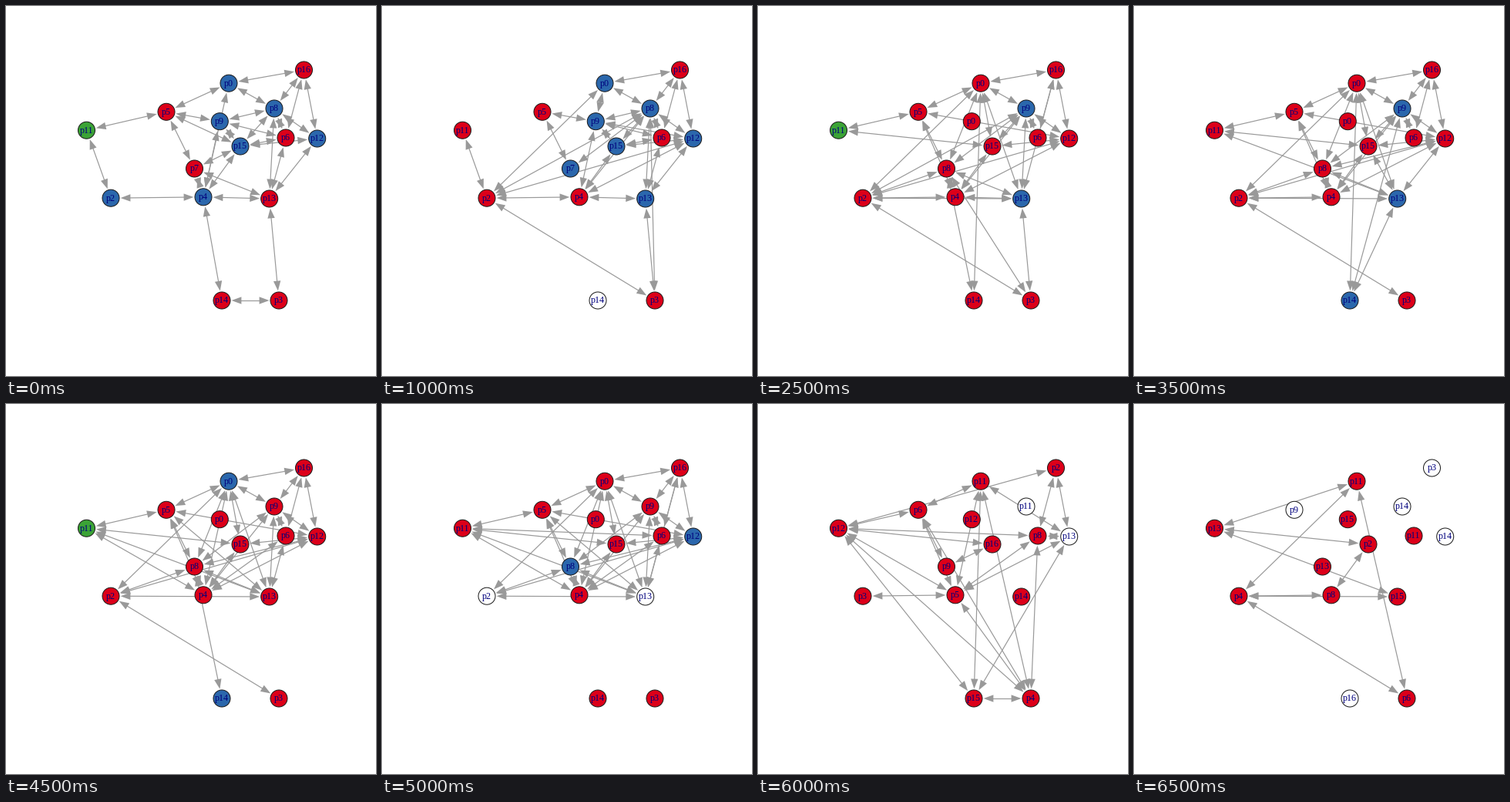
A matplotlib script for the animation above (7000 ms loop, 480 px wide and 480 px high).

```python
import numpy as np
import matplotlib.pyplot as plt
from matplotlib.animation import FuncAnimation
from matplotlib.collections import LineCollection, PolyCollection

SIZE, DPI = 480, 100
PT = 72 / DPI            # points per pixel
RADIUS = 11
GAP = 1.6                # space between a disc and an arrow tip
HEAD, HALF = 12.8, 4.7   # arrowhead length and half width
GREY = "#999999"
FILL = {"r": "#dc0019", "b": "#2b67ac", "g": "#3ba336", "w": "#ffffff"}

SLOTS = "ABCDEFGHIJKLMNO"
XS = [289, 386.5, 348, 403.7, 363, 277.3, 304, 208, 104.5, 244.5, 256, 136, 341.7, 280, 354]
YS = [100.2, 83, 133, 172, 171, 149.7, 182, 137.3, 161.2, 211, 247.8, 249.2, 250, 382, 382]
POS = {s: np.array(p) for s, p in zip(SLOTS, zip(XS, YS))}

NAMES = [
    "0 16 8 12 6 9 15 5 11 7 4 2 13 14 3".split(),
    "0 16 9 12 6 0 15 5 11 8 4 2 13 14 3".split(),
    "11 2 11 13 8 12 16 6 12 9 5 3 14 15 4".split(),
    "11 3 14 14 11 15 2 9 13 13 8 4 15 16 6".split(),
]


def links(text):
    """Expand 'A:BC D:E' into {'AB', 'AC', 'DE'}."""
    return {part[0] + end for part in text.split() for end in part[2:]}


START = links("A:BCHK B:CDE C:DEFGM D:GM E:FGM F:GHK G:HJK H:IJ I:L J:KM K:LMN M:O N:O")
HUB = links("A:BCFL B:CDE C:DEFGJKLMO D:FGKLM E:FGM F:GHK G:K H:J I:L K:LM L:O M:O")
DENSE = links("A:BCFGHLMN B:DEM C:DEFGHJKLMO D:FGKL E:F F:GHK G:K H:J J:KLMNO "
              "K:LM L:MO M:O")
SPLIT = links("A:BCGHJLMN B:CDE C:DEGJKN D:GHJKLM G:IKM H:IJK I:M J:KLM K:L L:MO M:N")
UPPER = links("A:BCGHJKLM B:CDEM C:DEJKM D:GHJKL E:IKM G:IK H:IJKM I:KM J:KLM L:M")
LATE = links("A:DHKNO B:DEI D:EKN E:IKO G:IJ H:IJKO I:KNO K:LO N:O")
LAST = links("A:ILO G:IK I:M K:L L:MO")

# (node colours, label set, links), one entry per half second
STATES = [
    ("brbbrbbrgrbbrrr", 0, START),
    ("rrbbrbbrbrbrbrr", 0, START - links("A:H G:H H:I") | links("C:JKL D:K")),
    ("brbbrbbrrbrrbwr", 0, HUB),
    ("grbbrbrrgbrrbgr", 0, HUB - links("C:O") | links("A:GMN C:H J:L")),
    ("rrbbrrrbwrrrbbr", 0, DENSE),
    ("rrbrrrrrgrrrbrr", 1, DENSE - links("A:F C:FHO D:F E:F F:GHK")
     | links("A:J D:H G:I H:IK")),
    ("brbrrrrrbrrrbbr", 1, SPLIT - links("C:N G:M") | links("C:M")),
    ("rrbrrrrrrrrrbbr", 1, SPLIT),
    ("rrbrrrrrrrrrbwr", 1, SPLIT - links("A:N C:N G:IM M:N") | links("A:K C:M I:K")),
    ("brrrrrrrgrrrrbr", 1, UPPER - links("B:M E:I") | links("J:N L:O")),
    ("rrrbrrrrrbrwwrr", 1, UPPER),
    ("rrrrrrrrrrrwrrr", 2, LATE | links("C:DEJK D:JM J:M")),
    ("rrwwrrrrrrrrrrr", 2, LATE),
    ("rwwwrrrwrrrrrwr", 3, LAST),
]


def arrow(a, b):
    """Shaft and both heads of a two-way link between slots a and b."""
    p, q = POS[a], POS[b]
    u = (q - p) / np.hypot(*(q - p))
    side = HALF * np.array([-u[1], u[0]])
    p, q = p + (RADIUS + GAP) * u, q - (RADIUS + GAP) * u
    heads = []
    for tip, d in ((p, u), (q, -u)):
        base = tip + HEAD * d
        heads.append([tip, base + side, base - side])
    return [p + 3 * u, q - 3 * u], heads


fig = plt.figure(figsize=(SIZE / DPI, SIZE / DPI), dpi=DPI, facecolor="white")
ax = fig.add_axes([0, 0, 1, 1])
ax.set_xlim(0, SIZE)
ax.set_ylim(SIZE, 0)
ax.axis("off")

shafts = LineCollection([], colors=GREY, linewidths=1.2 * PT, zorder=1)
heads = PolyCollection([], facecolors=GREY, edgecolors="none", zorder=2)
ax.add_collection(shafts)
ax.add_collection(heads)
discs = ax.scatter(XS, YS, s=(2 * RADIUS * PT) ** 2, edgecolors="#1a1a1a",
                   linewidths=1.0 * PT, zorder=3)
labels = [ax.text(x, y + 3.4, "", family="Liberation Serif", size=12 * PT,
                  color="#00007d", ha="center", va="baseline", zorder=4)
          for x, y in zip(XS, YS)]


def draw(i):
    colours, names, pairs = STATES[i]
    parts = [arrow(*pair) for pair in sorted(pairs)]
    shafts.set_segments([line for line, _ in parts])
    heads.set_verts([tri for _, ends in parts for tri in ends])
    discs.set_facecolors([FILL[c] for c in colours])
    for label, name in zip(labels, NAMES[names]):
        label.set_text("p" + name)
    return [shafts, heads, discs, *labels]


anim = FuncAnimation(fig, draw, frames=len(STATES), interval=500,
                     repeat=True, repeat_delay=0, blit=False)
plt.show()
```
